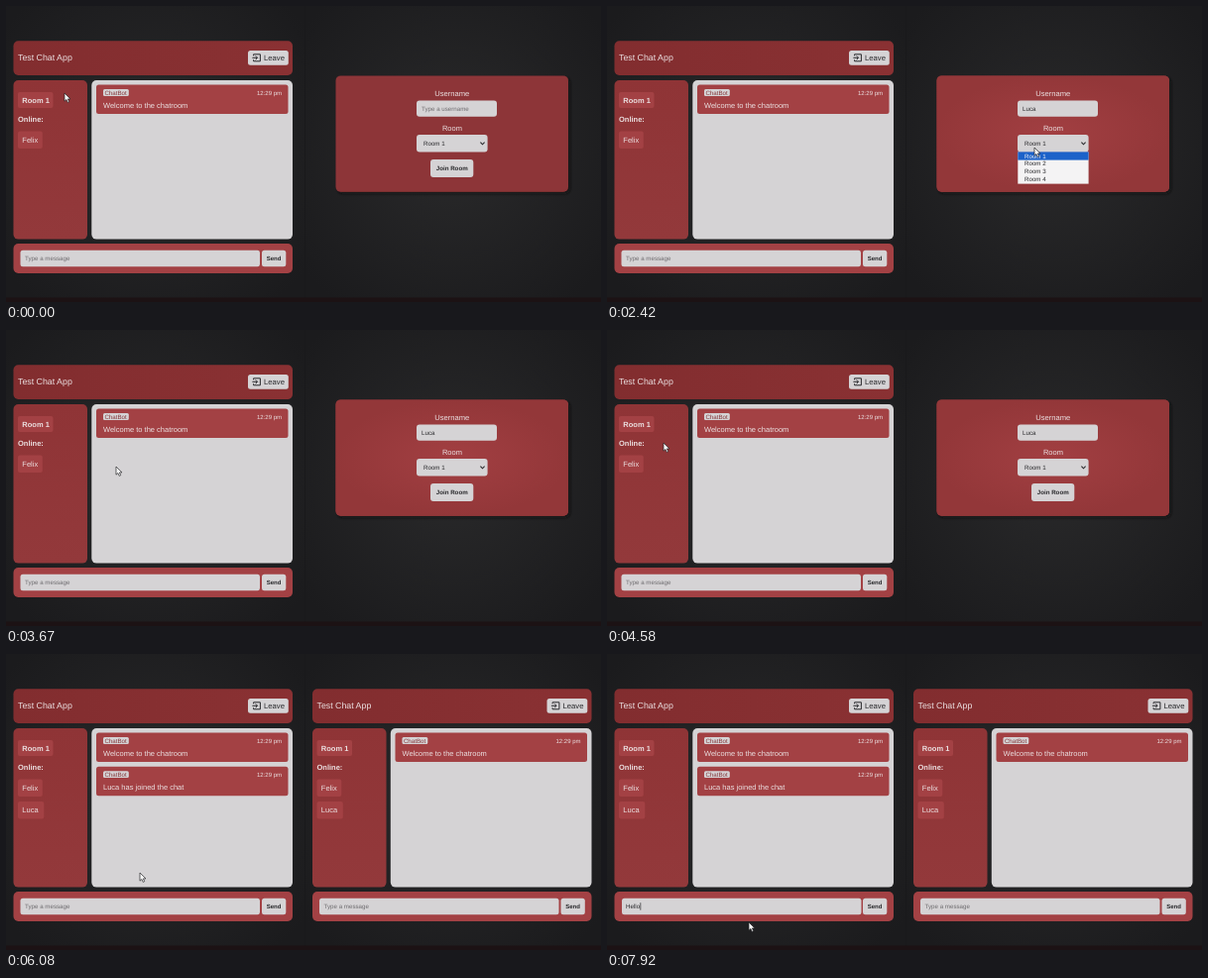
Animation, 600 px wide and 299 px high, one loop 8000 ms. Source, as an HTML page:

```html
<!DOCTYPE html>
<html lang="en">
<head>
<meta charset="utf-8">
<title>Chat rooms</title>
<style>
html, body { margin: 0; width: 100%; height: 100%; overflow: hidden; background: #1f1f20; }
svg { display: block; width: 100%; height: 100%; }
text { font-family: "Liberation Sans", Arial, sans-serif; white-space: pre; text-rendering: geometricPrecision; }
</style>
</head>
<body>
<svg id="stage" viewBox="0 0 600 299">
  <defs>
    <radialGradient id="page" cx="50%" cy="48%" r="65%">
      <stop offset="0" stop-color="#2a2a2b"/>
      <stop offset="1" stop-color="#1b1b1d"/>
    </radialGradient>
    <linearGradient id="bar" x1="0" x2="1" y1="0" y2="0">
      <stop offset="0" stop-color="#822d2f"/>
      <stop offset="1" stop-color="#8a3133"/>
    </linearGradient>
    <linearGradient id="side" x1="0" x2="0" y1="0" y2="1">
      <stop offset="0" stop-color="#8f3436"/>
      <stop offset="1" stop-color="#93393b"/>
    </linearGradient>
    <radialGradient id="glow">
      <stop offset="0" stop-color="#a23f42"/>
      <stop offset="1" stop-color="#933739"/>
    </radialGradient>
    <filter id="shadow" x="-10%" y="-10%" width="120%" height="125%">
      <feDropShadow dx="2" dy="2" stdDeviation="1.6" flood-color="#0a0a0b" flood-opacity=".75"/>
    </filter>
  </defs>
</svg>
<script>
const LOOP = 8000;
const HOST = "Felix", GUEST = "Luca";
const RED = "#a34144", PALE = "#d5d3d5", LIGHT = "#ebe0e1", INK = "#29292c", GREY = "#6f6d70";
const stage = document.getElementById("stage");

function add(parent, tag, attrs, content) {
  const el = document.createElementNS("http://www.w3.org/2000/svg", tag);
  for (const key in attrs) el.setAttribute(key, attrs[key]);
  if (content !== undefined) el.textContent = content;
  parent.appendChild(el);
  return el;
}
const group = (parent, x = 0, y = 0) => add(parent, "g", { transform: `translate(${x} ${y})` });
const box = (parent, x, y, x2, y2, r, fill) =>
  add(parent, "rect", { x, y, width: x2 - x, height: y2 - y, rx: r, fill });
const label = (parent, x, y, size, fill, content, extra = {}) =>
  add(parent, "text", { x, y, "font-size": size, fill, ...extra }, content);
const show = (el, on) => el.setAttribute("display", on ? "inline" : "none");
const BOLD = { "font-weight": "bold" };
const MIDDLE = { "text-anchor": "middle" };

function message(parent, y, content) {
  const g = group(parent, 91, y);
  box(g, 0, 0, 193.5, 29.5, 2.5, RED);
  box(g, 7, 4.6, 32.8, 11.4, 1.5, PALE);
  label(g, 8.4, 10.2, 6.2, "#87393c", "ChatBot");
  label(g, 187, 10.2, 6, LIGHT, "12:29 pm", { "text-anchor": "end" });
  label(g, 7, 23, 7.5, LIGHT, content);
  return g;
}

function tag(parent, y, width, height, content, extra) {
  const g = group(parent, 12, y);
  box(g, 0, 0, width, height, 2, RED);
  label(g, 4.3, height / 2 + 2.7, 7.5, LIGHT, content, extra);
  return g;
}

function chatPage(x) {
  const root = group(stage, x);
  box(root, 7.5, 35.3, 289, 70, 5, "url(#bar)");
  label(root, 12, 55.2, 8.8, LIGHT, "Test Chat App");
  box(root, 244, 45, 284.8, 59.8, 2.5, PALE);
  add(root, "path", {
    d: "M249.6 50.3V48.8H256.4V55.8H249.6V54.2M248.4 52.3H253.4M251.7 50.4L253.6 52.3L251.7 54.2",
    fill: "none", stroke: INK, "stroke-width": 1
  });
  label(root, 260, 55, 7.7, INK, "Leave");

  box(root, 7.5, 75, 82, 235.6, 5, "url(#side)");
  const blank = group(root);
  box(blank, 12, 87, 20, 95, 2, RED);
  const room = tag(root, 87, 35.5, 16, "Room 1", BOLD);
  const online = label(root, 12, 117, 7.5, LIGHT, "Online:", BOLD);
  const host = tag(root, 126.5, 24.8, 17.5, HOST);
  const guest = tag(root, 149, 26.3, 17.5, GUEST);

  box(root, 86.3, 75, 289, 235.6, 5, PALE);
  const welcome = message(root, 79.5, "Welcome to the chatroom");
  const joined = message(root, 113.7, GUEST + " has joined the chat");

  box(root, 7.5, 240, 289, 270, 5, RED);
  const field = box(root, 14.5, 246.8, 256, 263.3, 2.5, PALE);
  const entry = label(root, 19, 257.2, 6.2, GREY, "Type a message");
  box(root, 258, 246.8, 282.3, 263.3, 2.5, PALE);
  label(root, 270.1, 257.2, 6, INK, "Send", { ...BOLD, ...MIDDLE });
  return { root, blank, room, online, host, guest, welcome, joined, field, entry };
}

function joinPage() {
  const root = group(stage);
  box(root, 332.5, 70.4, 567, 187.8, 5, "#8d3437").setAttribute("filter", "url(#shadow)");
  const glow = box(root, 332.5, 70.4, 567, 187.8, 5, "url(#glow)");
  label(root, 449.7, 91.3, 7.6, LIGHT, "Username", MIDDLE);
  box(root, 414, 95.4, 495, 111.8, 3, PALE);
  const entry = label(root, 419, 105.8, 6.2, GREY, "Type a username");
  label(root, 449.9, 126, 7.5, LIGHT, "Room", MIDDLE);
  box(root, 414, 130, 485.6, 147.4, 3, PALE);
  label(root, 421, 141, 6.2, INK, "Room 1");
  add(root, "path", { d: "M478.4 137.6L480.5 139.8L482.6 137.6", fill: "none", stroke: INK, "stroke-width": 1.1 });
  box(root, 428, 155, 471.3, 173, 3, PALE);
  label(root, 449.7, 166.2, 6.2, INK, "Join Room", { ...BOLD, ...MIDDLE });

  const menu = group(root);
  box(menu, 414.3, 147.4, 485.6, 179.6, 0, "#f4f3f4");
  box(menu, 414.3, 147.4, 485.6, 155.6, 0, "#1c62c9");
  for (let i = 0; i < 4; i++)
    label(menu, 421, 153.5 + i * 7.8, 6.2, i ? INK : "#f2f2f4", "Room " + (i + 1));
  return { root, glow, entry, menu };
}

box(stage, 0, 0, 302, 299, 0, "url(#page)");
box(stage, 302, 0, 600, 299, 0, "url(#page)");
box(stage, 301, 0, 302, 299, 0, "#19191b");
box(stage, 0, 294.5, 600, 299, 0, "#1c1214");

const left = chatPage(0);
const right = chatPage(301.5);
const join = joinPage();
const caret = box(stage, 0, 0, 0.7, 7.5, 0, INK);
const pointer = group(stage);
const arrow = add(pointer, "path", {
  d: "M0 0V8.2L1.9 6.5L3.2 9.4L4.7 8.7L3.4 5.9H6Z",
  fill: "#f7f7f7", stroke: "#252527", "stroke-width": 0.7, "stroke-linejoin": "round"
});
const beam = add(pointer, "path", {
  d: "M-1.5 -4H1.5M0 -4V4M-1.5 4H1.5", fill: "none", stroke: "#333336", "stroke-width": 0.7
});

// time, x, y
const path = [
  [80, 59, 88], [830, 455, 104], [1580, 455, 104], [2080, 436, 139], [2330, 431, 143],
  [2500, 431, 143], [2700, 431, 151], [2900, 431, 151], [3220, 372, 180], [3670, 111, 138],
  [3950, 34, 132], [4200, 34, 132], [4500, 57, 114], [4580, 57, 114], [4900, 445, 166],
  [5250, 445, 166], [5670, 470, 92], [5750, 470, 92], [6080, 135, 221], [6350, 112, 254],
  [6670, 112, 254], [7000, 143, 271]
];

function pointerAt(t) {
  if (t <= path[0][0]) return path[0].slice(1);
  for (let i = 1; i < path.length; i++) {
    const [t0, x0, y0] = path[i - 1], [t1, x1, y1] = path[i];
    if (t < t1) {
      const p = (t - t0) / (t1 - t0), e = p * p * (3 - 2 * p);
      return [x0 + (x1 - x0) * e, y0 + (y1 - y0) * e];
    }
  }
  return path[path.length - 1].slice(1);
}

const typed = (word, times, t) => word.slice(0, times.filter(at => t >= at).length);

function fill(entry, word, hint) {
  entry.textContent = word || hint;
  entry.setAttribute("fill", word ? INK : GREY);
}

function placeCaret(entry, word, on) {
  if (!on) return;
  caret.setAttribute("x", +entry.getAttribute("x") + (word ? entry.getComputedTextLength() + 0.4 : 0));
  caret.setAttribute("y", +entry.getAttribute("y") - 6);
}

function draw(t) {
  const entered = t >= 5000, ready = t >= 5250;
  show(join.root, !entered);
  show(right.root, entered);
  show(join.menu, t >= 2250 && t < 2830);
  join.glow.setAttribute("opacity", Math.min(1, Math.max(0, (t - 80) / 750)));

  show(left.blank, false);
  show(left.guest, ready);
  show(left.joined, entered);
  show(right.blank, !ready);
  for (const part of ["room", "host", "guest", "welcome"]) show(right[part], ready);
  show(right.joined, false);
  right.online.setAttribute("y", ready ? 117 : 108.4);

  const user = typed(GUEST, [1250, 1330, 1415, 1580], t);
  const text = typed("Hello", [7080, 7250, 7410, 7500, 7660], t);
  fill(join.entry, user, "Type a username");
  fill(left.entry, text, "Type a message");
  left.field.setAttribute("x", t >= 6400 ? 15 : 14.5);

  const naming = t >= 920 && t < 2080, writing = t >= 6400;
  placeCaret(join.entry, user, naming);
  placeCaret(left.entry, text, writing);
  show(caret, naming || writing);

  const [x, y] = pointerAt(t);
  const overName = !entered && x > 414 && x < 495 && y > 95.4 && y < 111.8;
  const overText = x > 14.5 && x < 256 && y > 246.8 && y < 263.3;
  pointer.setAttribute("transform", `translate(${x.toFixed(2)} ${y.toFixed(2)})`);
  show(arrow, !overName && !overText);
  show(beam, overName || overText);
}

const start = performance.now();
function tick() {
  draw((performance.now() - start) % LOOP);
  requestAnimationFrame(tick);
}
tick();
</script>
</body>
</html>
```
